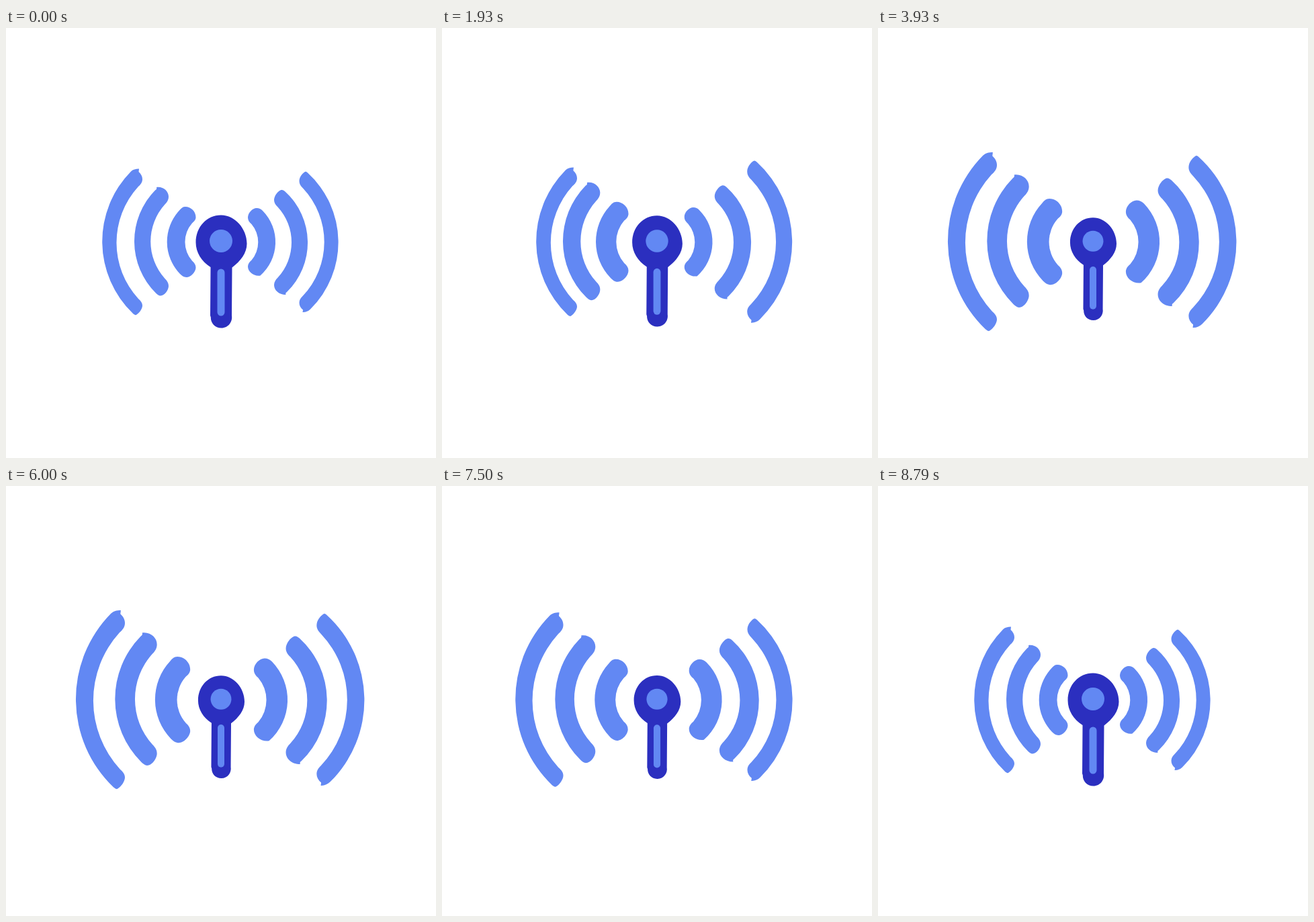
An HTML page that plays this animation: 640x640 px, repeating every 10000 ms.

```html
<!DOCTYPE html>
<html lang="en">
<head>
<meta charset="utf-8">
<title>Signal</title>
<style>
  html, body { margin: 0; width: 100%; height: 100%; overflow: hidden; background: #fff; }
  svg { display: block; width: 100%; height: 100%; }
  .light { fill: #6288f3; }
  .dark { fill: #2b2fbf; }
</style>
</head>
<body>
<svg viewBox="0 0 640 640">
  <path id="l3" class="light" d="M186 213.5C189 210.5 193 209.5 198 209.5L197.5 214C201 217 203 221 203 225C203 230 200 233.5 196.5 236.5A123.5 123.5 0 0 0 197 403C200.5 406 203 409 203 413C203 418 198 424.5 194.5 426.5C193 427.8 191.5 427 189 425A148.5 148.5 0 0 1 186 213.5Z"/>
  <path id="l2" class="light" d="M222 241.5Q225 240 224 237C234 235.5 242 243 242 251C242 256 239.5 259.5 236.5 262.5A82.4 82.4 0 0 0 236.5 373C240 376.5 242 379.5 242 384C242 390 236 398.5 230 398.5C227.5 398.5 225 396.5 223 394.5A108.6 108.6 0 0 1 222 241.5Z"/>
  <path id="l1" class="light" d="M258 271.5C261 268 263 266 267 266C275 266 282.5 273 282.5 281.5C282.5 285.5 280 288 277 290.5A42.4 42.4 0 0 0 277 346.5C280.5 349.5 282.5 352.5 282.5 356.5C282.5 363 275 371 268.5 371C264.5 371 261.5 368.5 259 366A68.8 68.8 0 0 1 258 271.5Z"/>
  <path id="r1" class="light" d="M382 272A66.5 66.5 0 0 1 378.5 368.5C369 370 360 363 360 355C360 351 362.5 348 365.5 345.5A41.5 41.5 0 0 0 365.5 292C362 289 360 286 360 282C360 275 367 268 373 268C376.5 268 379.5 269.5 382 272Z"/>
  <path id="r2" class="light" d="M415.5 243.5A102.7 102.7 0 0 1 418 393Q415.5 394 416.5 397C406 397 399 390 399 382.5C399 378 401.5 374.5 404.5 371.5A77.5 77.5 0 0 0 404.5 266.5C401 263 399 260 399 256C399 249.5 405 242.5 409 241.2C411.5 240.4 413.5 241.7 415.5 243.5Z"/>
  <path id="r3" class="light" d="M449 215.5A140 140 0 0 1 453 418.5C450 421.5 446 423.2 441.5 423L442 419.5C438.5 416.5 436.5 413 436.5 409C436.5 404.5 438.5 402 441.5 399A116.8 116.8 0 0 0 442 238.5C438.5 235 436.5 232 436.5 228C436.5 222 440.5 217 444.5 214.2C446 213.2 447 213.7 449 215.5Z"/>
  <g id="mast">
    <path class="dark" d="M304.5 356C291 347.5 282.5 334 282.5 319C282.5 296 299 278.5 320 278.5C341 278.5 358.5 299 358.5 321C358.5 335 349 347 336.5 356.5L336 428C337.5 437 331 446.5 320.5 446.5C311 446.5 304.5 439 304.8 430.5L304 428Z"/>
    <circle class="light" cx="320" cy="317" r="17"/>
    <rect class="light" x="314.5" y="358.5" width="11" height="70" rx="5.5"/>
  </g>
</svg>
<script>
const LOOP = 10000, FPS = 14, CENTER = 320;
const GROW = 11 / 9, SHRINK = 10 / 11;
const OUT_TIMES = [1150, 1930, 2210, 2930, 3290, 3930];
const BACK_TIMES = [5930, 7000, 7500, 8070, 8790];

// Smooth monotone curve through the points, at rest at both ends
function curve(times, inner) {
  const vals = [0, ...inner, 1], last = vals.length - 1;
  const rate = i => (vals[i + 1] - vals[i]) / (times[i + 1] - times[i]);
  const slope = vals.map((_, i) => {
    if (i === 0 || i === last) return 0;
    const a = rate(i - 1), b = rate(i);
    return a && b ? 2 * a * b / (a + b) : 0;
  });
  return t => {
    if (t <= times[0]) return 0;
    if (t >= times[last]) return 1;
    let i = 0;
    while (t > times[i + 1]) i++;
    const h = times[i + 1] - times[i], u = (t - times[i]) / h, v = 1 - u;
    return vals[i] * v * v * (1 + 2 * u) + vals[i + 1] * u * u * (3 - 2 * u)
      + h * u * v * (slope[i] * v - slope[i + 1] * u);
  };
}

function part(id, scale, out, back) {
  const rise = curve(OUT_TIMES, out), fall = curve(BACK_TIMES, back);
  const el = document.getElementById(id);
  return t => {
    const k = 1 + (scale - 1) * (rise(t) - fall(t));
    el.setAttribute("transform",
      `translate(${CENTER} ${CENTER}) scale(${k}) translate(${-CENTER} ${-CENTER})`);
  };
}

const early = [.115, .305, .82], middle = [.065, .21, .62], late = [.028, .135, .41];
const parts = [
  part("l1", GROW, [.60, .77, .985, .998], early),
  part("r3", GROW, [.685, .83, .975, .998], early),
  part("l2", GROW, [.385, .57, .945, .987], middle),
  part("r2", GROW, [.385, .57, .94, .987], middle),
  part("l3", GROW, [.077, .19, .628, .82], late),
  part("r1", GROW, [.082, .19, .62, .82], late),
  part("mast", SHRINK, [.18, .36, .90, .97], [.015, .09, .35])
];

const start = performance.now();
function draw(now) {
  const t = Math.max(0, now - start) % LOOP;
  const step = Math.floor((t + 5) * FPS / 1000) % (LOOP * FPS / 1000);
  parts.forEach(move => move(step * 1000 / FPS));
  requestAnimationFrame(draw);
}
draw(start);
</script>
</body>
</html>
```
